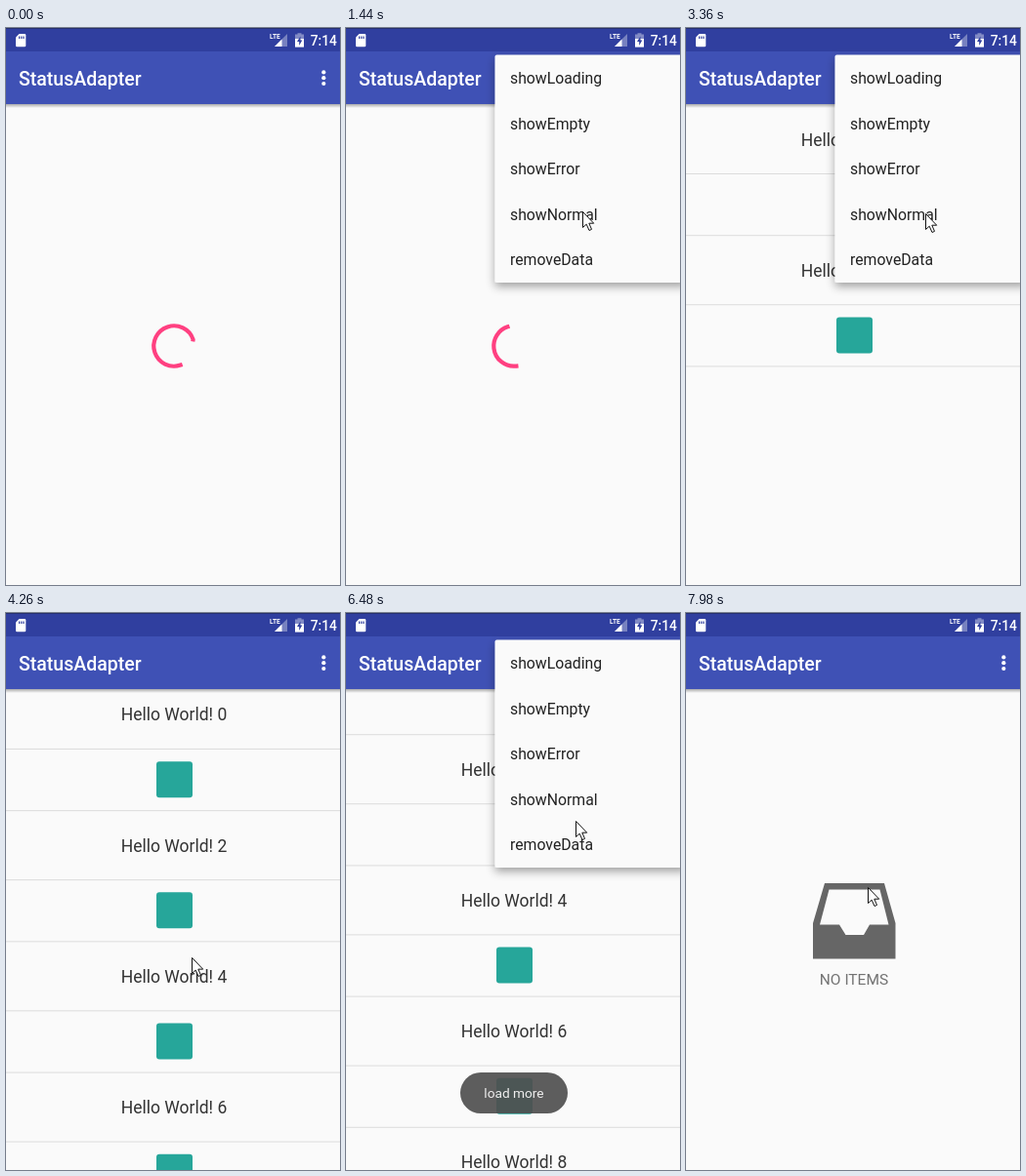
Animation of 342x571 px, one loop 8000 ms. Source, as an HTML page:

```html
<!DOCTYPE html>
<html lang="en">
<head>
<meta charset="utf-8">
<title>StatusAdapter</title>
<style>
  html, body { margin: 0; width: 100%; height: 100%; overflow: hidden; background: #fafafa; }
  svg { display: block; width: 100vw; height: 100vh; }
  text { font-family: Roboto, sans-serif; }
  .mid { text-anchor: middle; }
  .ring { fill: none; stroke: #ff4081; stroke-linecap: square; }
</style>
</head>
<body>
<svg viewBox="0 0 342 571">
  <defs>
    <linearGradient id="fall" x2="0" y2="1">
      <stop offset="0" stop-opacity=".32"/>
      <stop offset="1" stop-opacity="0"/>
    </linearGradient>
    <filter id="lift" x="-20%" y="-20%" width="140%" height="140%">
      <feDropShadow dx="0" dy="4" stdDeviation="5" flood-opacity=".36"/>
    </filter>
    <clipPath id="reveal"><rect id="revealBox" y="0"/></clipPath>
  </defs>
  <rect width="342" height="571" fill="#fafafa"/>

  <g id="list">
    <g id="rows"></g>
    <g id="more">
      <circle id="smallRing" class="ring" r="9" stroke-width="2" pathLength="360"/>
      <text x="161" y="643.7" font-size="13.6" fill="#757575">load more</text>
    </g>
  </g>

  <circle id="bigRing" class="ring" r="20.7" stroke-width="4.2" pathLength="360"/>

  <g id="empty" fill="#666">
    <path fill-rule="evenodd" d="M142 277H203L214.5 318V354.5H130V318ZM146.500 283.500L137 319.500H157L163.500 330H182L188 319.500H207.500L198.500 283.500Z"/>
    <text class="mid" x="172" y="381" font-size="15.5" fill="#737373">NO ITEMS</text>
  </g>

  <rect y="78" width="342" height="4" fill="url(#fall)"/>
  <rect width="342" height="78" fill="#3f51b5"/>
  <rect width="342" height="24" fill="#303f9f"/>
  <rect width="342" height="1" fill="#26306f"/>
  <g fill="#fff">
    <path d="M13.500 6H19Q20.300 6 20.300 7.300V18Q20.300 19.300 19 19.300H11.300Q10 19.300 10 18V9.500Z"/>
    <path d="M13 8.500h1.200v2.500h-1.200zM15.200 8.500h1.200v2.500h-1.200zM17.400 8.500h1.200v2.500h-1.200z" fill="#303f9f"/>
    <text x="270" y="11" font-size="6.6" font-weight="700">LTE</text>
    <path d="M288 6V19H275Z" opacity=".35"/>
    <path d="M282.500 11.500V19H275Z"/>
    <path d="M298.500 6.500V5.300H302.500V6.500H305V19.500H296V6.500Z" opacity=".4"/>
    <path d="M296 11H305V19.500H296Z"/>
    <path d="M301.500 8.500L298 14H300.200V18L303.300 12.500H301.500Z" fill="#303f9f"/>
    <text x="311.700" y="18" font-size="13.8" font-weight="500">7:14</text>
    <text x="13" y="58.500" font-size="19.5" font-weight="500">StatusAdapter</text>
    <circle cx="325.300" cy="45.400" r="2.100"/>
    <circle cx="325.300" cy="51.200" r="2.100"/>
    <circle cx="325.300" cy="57" r="2.100"/>
  </g>

  <g id="toast">
    <rect x="117" y="471" width="110" height="42" rx="21" fill="#505050" fill-opacity=".92"/>
    <text class="mid" x="172" y="497" font-size="13.7" fill="#eee">load more</text>
  </g>

  <g id="menu">
    <g filter="url(#lift)"><g id="sheet" clip-path="url(#reveal)">
      <rect x="152.500" y="27.500" width="196" height="233.500" rx="2" fill="#fafafa"/>
    </g></g>
  </g>

  <path id="cursor" d="M.5.5V16.500L4.200 13.200L7 19.500L9.500 18.400L6.800 12.200H11.700Z" fill="#fff" stroke="#111" stroke-width="1"/>
</svg>
<script>
const LOOP = 8000, TICK = 60, TOP = 78, PAIR = 134.2;
const $ = id => document.getElementById(id);
const clamp = u => Math.min(1, Math.max(0, u));
const ramp = (t, from, to) => clamp((t - from) / (to - from));
const smooth = u => u * u * (3 - 2 * u);
const show = (id, on) => $(id).setAttribute('display', on ? 'inline' : 'none');

function add(parent, tag, attrs, text = '') {
  const el = document.createElementNS('http://www.w3.org/2000/svg', tag);
  for (const k in attrs) el.setAttribute(k, attrs[k]);
  el.textContent = text;
  return parent.appendChild(el);
}

// Each pair is a text row followed by an icon row.
const pairs = [0, 1, 2, 3, 4].map(i => {
  const g = add($('rows'), 'g', { transform: `translate(0 ${TOP + i * PAIR})` });
  add(g, 'text', { class: 'mid', x: 172, y: 42.5, 'font-size': 17.5, fill: '#333' }, `Hello World! ${i * 2}`);
  add(g, 'rect', { x: 154, y: 84.2, width: 37, height: 37, rx: 3, fill: '#26a69a' });
  for (const y of [71, PAIR]) add(g, 'rect', { y, width: 342, height: 1, fill: '#dcdcdc' });
  return g;
});

['showLoading', 'showEmpty', 'showError', 'showNormal', 'removeData'].forEach((label, i) =>
  add($('sheet'), 'text', { x: 168, y: 57 + i * 46.6, 'font-size': 15.8, fill: '#222' }, label));

const NORMAL = 1620, ADDED = 3540, LOADED = 6180, EMPTY = 7200;
const menuTimes = [[540, NORMAL], [2540, 3500], [5840, EMPTY]];
const drag = [4200, 4485, 88];

// time, x, y of the pointer tip
const route = [
  [0, 352, 76], [420, 318, 55], [660, 318, 55], [1380, 242, 188], [1620, 242, 188],
  [2340, 310, 66], [2460, 316, 55], [2640, 316, 55], [3360, 245, 190], [3500, 245, 190],
  [3960, 190, 363], [4200, 190, 363], [4485, 190, 275], [4740, 190, 275],
  [5340, 292, 100], [5640, 318, 51], [5940, 318, 51], [6480, 235, 213],
  [6600, 235, 213], [7080, 290, 108], [7260, 290, 108], [7500, 294, 118], [7980, 186, 281]
];

function pointer(t) {
  const i = Math.max(1, route.findIndex(k => k[0] >= t));
  const [a, b] = [route[i - 1], route[i]];
  const u = smooth(ramp(t, a[0], b[0]));
  return [1, 2].map(k => a[k] + (b[k] - a[k]) * u);
}

// Material standard curve, cubic-bezier(.4, 0, .2, 1)
function standard(x) {
  let lo = 0, hi = 1;
  for (let i = 0; i < 20; i++) {
    const u = (lo + hi) / 2, v = 1 - u;
    if (1.2 * v * v * u + 0.6 * v * u * u + u ** 3 < x) lo = u; else hi = u;
  }
  return smooth(lo);
}

function spin(id, cx, cy, age, turn) {
  const cycles = age / 1250, p = cycles - Math.floor(cycles);
  const start = 270 * standard(clamp(2 * p - 1));
  const end = 270 * standard(clamp(2 * p));
  const angle = turn - 90 + start + 90 * cycles + 0.178 * age - 270 * 0 + 0;
  const base = angle - 90 * Math.floor(cycles) + 360 * Math.floor(cycles);
  const len = Math.max(0.1, end - start);
  $(id).setAttribute('stroke-dasharray', `${len} ${360 - len}`);
  $(id).setAttribute('transform', `translate(${cx} ${cy}) rotate(${base})`);
}

function drawMenu(t) {
  const span = menuTimes.find(([a, b]) => t >= a && t < b + 180);
  show('menu', span);
  if (!span) return;
  const open = standard(ramp(t, span[0], span[0] + 240));
  const box = { x: 342 - 192 * open, width: 20 + 192 * open, height: 27 + 236 * open };
  for (const k in box) $('revealBox').setAttribute(k, box[k]);
  $('menu').setAttribute('opacity', Math.min(1, open * 1.5) * (1 - ramp(t, span[1], span[1] + 180)));
}

function draw(t) {
  show('bigRing', t < NORMAL);
  spin('bigRing', 172, 326, t + 625, 5);

  show('list', t >= NORMAL && t < EMPTY);
  const scroll = drag[2] * smooth(ramp(t, drag[0], drag[1]));
  $('list').setAttribute('transform', `translate(0 ${-scroll})`);
  const count = t < ADDED ? 2 : t < LOADED ? 4 : 5;
  pairs.forEach((g, i) => g.setAttribute('display', i < count ? 'inline' : 'none'));
  show('more', t >= ADDED && t < LOADED);
  spin('smallRing', 134.5, 639, t - 4490, 28);

  show('empty', t >= EMPTY);
  $('toast').setAttribute('opacity', ramp(t, 4420, 4720) * (1 - ramp(t, 6780, 7080)));
  drawMenu(t);
  $('cursor').setAttribute('transform', `translate(${pointer(t)})`);
}

function frame(now) {
  draw(Math.floor(now % LOOP / TICK) * TICK);
  requestAnimationFrame(frame);
}
draw(0);
requestAnimationFrame(frame);
</script>
</body>
</html>
```
